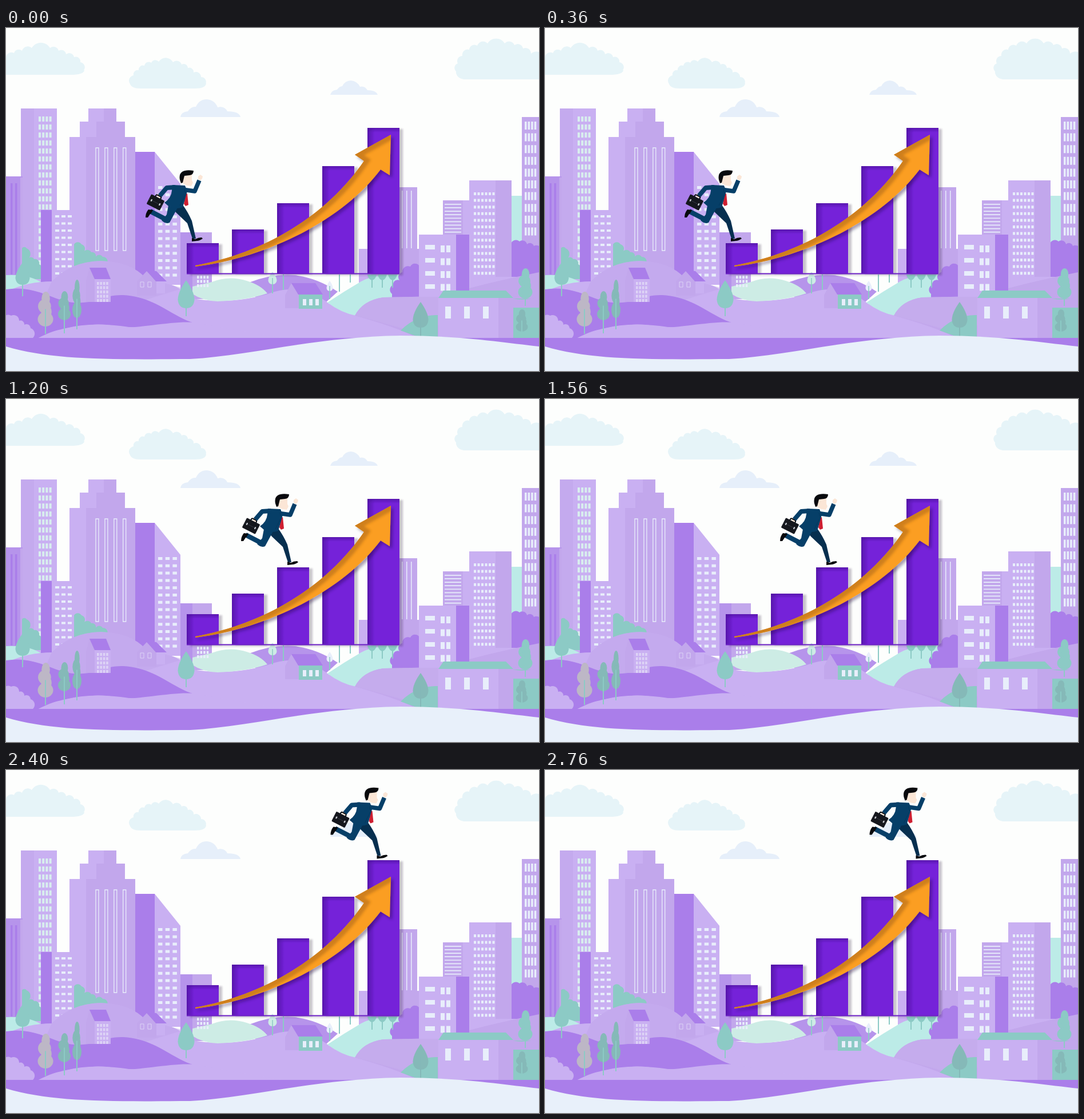
Write an HTML page that moves like this. It is 932x601 px and loops after 3 s.

```html
<!DOCTYPE html>
<html lang="en">
<head>
<meta charset="utf-8">
<title>Climbing the chart</title>
<style>
  html, body { margin: 0; width: 100%; height: 100%; overflow: hidden; background: #fdfefd; }
  svg { display: block; width: 932px; height: 601px; }
</style>
</head>
<body>
<svg id="stage" viewBox="0 0 932 601" xmlns="http://www.w3.org/2000/svg"></svg>
<script>
const C = {
  light: '#c9b0f2', mid: '#c2a7ec', soft: '#b694eb', dark: '#aa7eea',
  teal: '#8ccac5', mint: '#bcebe7', pale: '#cdece5', glass: '#e8eefb',
  leaf: '#85b9b8', grey: '#bdb7c6', sky: '#e6f4f8', haze: '#e6effa',
  navy: '#063f68', deep: '#062f4f', skin: '#fbe6d6', ink: '#08090d'
};

const path = (d, fill, extra = '') => `<path d="${d}" fill="${fill}" ${extra}/>`;
const box = (x, y, x2, y2, fill) => path(`M${x} ${y}H${x2}V${y2}H${x}z`, fill);
const line = (d, stroke, w, extra = '') => path(d, 'none', `stroke="${stroke}" stroke-width="${w}" ${extra}`);

// Regular block of windows
function grid(x, y, cols, rows, dx, dy, w, h, fill = C.glass) {
  let d = '';
  for (let r = 0; r < rows; r++)
    for (let c = 0; c < cols; c++)
      d += `M${x + c * dx} ${y + r * dy}h${w}v${h}h${-w}z`;
  return path(d, fill);
}

// Puffy outline: an arc over each pair of points, closed along a flat base
function puffs(pts, base, fill) {
  let d = `M${pts[0]}`;
  for (let i = 1; i < pts.length; i++) {
    const [a, b] = [pts[i - 1], pts[i]];
    const r = Math.hypot(b[0] - a[0], b[1] - a[1]) * 0.58;
    d += `A${r} ${r} 0 0 1 ${b}`;
  }
  return path(`${d}V${base}H${pts[0][0]}z`, fill);
}

function leafTree(x, top, low, foot, w, fill, trunk = fill) {
  const h = low - top;
  return line(`M${x} ${top + h * .4}V${foot}`, trunk, 2) +
    path(`M${x} ${top}C${x + w * .3} ${top + h * .25} ${x + w * .5} ${top + h * .5} ${x + w * .5} ${top + h * .7}
      Q${x + w * .45} ${low} ${x} ${low}Q${x - w * .45} ${low} ${x - w * .5} ${top + h * .7}
      C${x - w * .5} ${top + h * .5} ${x - w * .3} ${top + h * .25} ${x} ${top}z`, fill) +
    line(`M${x} ${top + h * .5}V${foot}`, trunk, 1.5);
}

function wavyTree(x, top, low, foot, w, fill, trunk = C.teal) {
  const h = low - top, blob = (dx, f, rx, ry) =>
    `<ellipse cx="${x + dx * w}" cy="${top + f * h}" rx="${rx * w}" ry="${ry * h}" fill="${fill}"/>`;
  return blob(.02, .2, .27, .2) + blob(-.06, .42, .42, .2) + blob(.06, .58, .34, .2) + blob(0, .79, .5, .21) +
    line(`M${x} ${top + h * .5}V${foot}`, trunk, 2);
}

function clouds() {
  return puffs([[-8, 76], [0, 52], [14, 44], [28, 40], [45, 35], [77, 35], [92, 40], [105, 46], [119, 51], [130, 60], [136, 74]], 76, C.sky) +
    path('M-8 74H137Q136 82 112 82H-8z', C.sky) +
    puffs([[217, 98], [223, 83], [232, 74], [242, 66], [254, 61], [267, 59], [292, 60], [307, 64], [318, 70], [328, 78], [341, 86], [349, 98]], 99, C.sky) +
    path('M217 97H350Q349 106 330 106H236Q218 106 217 97z', C.sky) +
    puffs([[787, 76], [790, 62], [798, 49], [810, 38], [824, 31], [842, 27], [872, 27], [889, 30], [904, 36], [918, 45], [940, 51]], 80, C.sky) +
    path('M787 74H932V90H801Q786 88 787 74z', C.sky) +
    path('M305 156Q306 147 318 146Q324 137 332 138Q338 125 351 125Q365 126 370 139Q382 136 387 146Q408 146 410 156z', C.haze) +
    path('M567 117Q569 109 579 108Q583 102 588 102Q593 92 603 92Q614 93 619 103Q627 101 632 109Q647 109 650 117z', C.haze);
}

function leftCity() {
  return box(26, 141, 49, 445, C.mid) + box(49, 141, 89, 445, C.light) + box(26, 141, 49, 445, '#c4aaee') +
    grid(57, 155, 4, 20, 6.2, 14, 4, 9, '#d8eeee') +
    box(0, 260, 29, 434, C.soft) + box(25, 262, 29, 434, C.mid) +
    grid(8, 272, 2, 1, 8, 0, 3.5, 160, C.dark) +
    puffs([[28, 386], [36, 386], [39, 404], [49, 405], [58, 414], [61, 436]], 440, C.teal) +
    path('M144 141H193V164H208V191H226V446H111V191H129V164H144z', C.mid) +
    path('M144 141H171V164H158V191H140V446H111V191H129V164H144z', C.light) +
    grid(157, 210, 4, 1, 15.9, 0, 5, 180, 'none').replace('/>', ` stroke="${C.glass}" stroke-width="1.3"/>`) +
    puffs([[119, 379], [132, 379], [136, 392], [149, 393], [157, 401], [169, 401], [177, 412]], 425, C.teal) +
    box(61, 319, 80, 445, C.dark) + box(80, 319, 117, 445, C.light) +
    grid(86, 328, 3, 9, 11, 12.5, 7, 4) +
    box(226, 217, 260, 446, C.dark) + path('M260 217L305 273V450H260z', C.light) +
    grid(266, 277, 3, 13, 12.7, 12.8, 7.5, 5) +
    box(305, 358, 326, 475, C.soft) + box(326, 358, 360, 475, C.mid);
}

function rightCity() {
  return box(687, 279, 719, 390, C.mid) + grid(692, 285, 3, 1, 8, 0, 1.5, 101) +
    box(617, 387, 722, 446, C.light) + box(632, 387, 722, 446, C.mid) +
    box(884, 294, 902, 378, C.mint) +
    box(902, 156, 932, 440, C.mid) + grid(907, 164, 4, 10, 5.6, 20.6, 3.5, 14) +
    puffs([[883, 378], [898, 374], [911, 379], [923, 382], [936, 389]], 445, C.dark) +
    box(764, 302, 799, 364, C.mid) + box(799, 302, 810, 364, C.light) +
    grid(767, 308, 1, 9, 0, 6.1, 29, 1.7) +
    box(810, 267, 859, 462, C.light) + box(856, 267, 884, 462, C.mid) +
    grid(818, 288, 6, 13, 6.5, 11.6, 4, 5);
}

function hills() {
  return path('M0 433Q40 431 62 446V468H0z', C.mint) +
    path('M425 446Q465 430 505 433Q545 438 580 462L560 480H440z', C.soft) +
    path('M0 462Q38 444 80 444Q112 410 165 408Q219 410 244 438L270 445Q300 449 326 474Q400 486 470 462Q520 448 565 483L620 500L700 468V436H932V545H0z', C.light) +
    path('M80 444Q112 410 165 408Q219 410 244 438L310 456L200 490H60z', C.mid, 'opacity=".55"') +
    path('M360 445Q390 433 421 443Q445 450 457 465Q422 477 370 479Q344 478 326 466V453L360 445z', C.pale) +
    path('M562 481Q592 461 621 444Q642 432 688 432H722V475L612 504Q586 499 562 481z', C.mint) +
    puffs([[675, 466], [677, 450], [688, 442], [693, 428], [707, 418], [722, 416]], 472, C.dark) +
    path('M610 504Q624 477 660 472L760 470Q840 446 932 428V545H722Q690 526 610 504z', C.mid) +
    path('M610 504Q624 477 660 472L760 470V520L712 532Q670 519 610 504z', '#c5aced') +
    path('M0 458Q24 454 47 460C82 468 98 484 135 481C165 479 174 467 205 468C260 471 288 504 326 516C270 520 246 526 215 524Q150 514 105 526L57 543H0z', C.dark) +
    path('M57 543C85 528 107 525 132 523C174 514 190 526 226 524C276 519 300 514 330 516L480 543z', C.light) +
    puffs([[-6, 512], [9, 504], [23, 513], [32, 520], [43, 526], [47, 543]], 543, C.light) +
    path('M690 530Q718 502 755 503V541H720z', C.teal) + box(886, 474, 932, 543, C.teal) +
    path('M886 474Q908 479 932 470V490H886z', C.mid);
}

function houses() {
  return path('M140 443L146 420L158 440V480H140z', C.mid) + box(155, 440, 183, 480, C.light) +
    path('M146 420H175L183 440H155z', C.dark) + grid(159, 445, 4, 5, 5.4, 7.5, 3.5, 5, '#ddd3f6') +
    path('M229 444L246 426L263 444V469H229z', C.mid) + path('M245 424L263 426L281 444H262z', C.dark) +
    box(263, 444, 278, 465, C.light) + grid(235, 445, 2, 1, 13, 0, 6, 9, 'none').replace('/>', ` stroke="#ddd3f6"/>`) +
    grid(334, 434, 4, 3, 5.6, 7.5, 3.5, 5) +
    path('M488 468L499 447L513 467V491H488z', C.mid) + path('M499 447H541L554 467H511z', C.dark) +
    box(512, 467, 553, 492, C.teal) + grid(519, 475, 3, 1, 11, 0, 6, 11) +
    box(722, 362, 787, 471, C.light) + box(787, 362, 810, 462, C.dark) +
    grid(733, 380, 1, 4, 0, 23, 17, 8) + grid(760, 381, 2, 4, 10, 22.5, 7, 12) +
    box(756, 472, 861, 543, C.light) + box(861, 472, 887, 543, C.mid) +
    path('M765 460H874L887 473H756z', C.teal) + grid(768, 488, 3, 1, 33, 0, 10, 21);
}

function trees() {
  let fringe = '';
  for (let x = 640; x < 682; x += 18)
    fringe += path(`M${x - 8} 432h16q-2 9 -8 10q-6 -1 -8 -10z`, C.teal) + line(`M${x} 434V455`, C.teal, 2);
  return leafTree(29, 411, 450, 470, 25, C.teal) +
    wavyTree(69, 462, 523, 536, 27, C.grey) + wavyTree(102, 461, 512, 535, 22, C.leaf) +
    wavyTree(124, 441, 508, 528, 16, C.leaf) + leafTree(315, 442, 491, 505, 29, C.teal) +
    leafTree(466, 427, 449, 465, 15, C.pale, C.teal) + line('M485 432V459M583 432V462M602 432V446', C.teal, 2) +
    leafTree(566, 443, 461, 475, 11, C.glass, C.teal) + fringe +
    leafTree(725, 480, 525, 540, 27, C.leaf) +
    wavyTree(908, 421, 474, 487, 25, C.teal) + wavyTree(902, 493, 532, 535, 21, C.leaf);
}

function ground() {
  return box(0, 543, 932, 601, C.dark) +
    path('M0 558C80 582 180 581 322 580C430 574 540 541 690 539C790 539 862 550 932 558V601H0z', '#e8f0fa');
}

const edge = 'M331 416C450 395 560 330 626 233L610 222L673 187';
const arrow = edge + 'L671 258L655 248C590 335 460 402 331 418z';

function runner() {
  const limb = 'stroke-linejoin="round"';
  return line('M294 314L281 336L252 321', C.navy, 8.5, limb) +
    path('M286 310H309Q318 322 325 338L332 369H326L317 342L298 324z', C.deep) +
    path('M284 311L300 315L286 341Q279 344 272 337L281 327z', C.navy) +
    path('M244 332Q244 324 249 318L257 319Q254 325 252 326L248 332z', C.ink) +
    path('M325 374V368L331 370Q336 367 342 367L344 369Q338 373 334 373z', C.ink) +
    `<circle cx="268" cy="294" r="4" fill="${C.skin}"/>` +
    `<g transform="translate(261.5 305.5) rotate(27)">
      <rect x="-5" y="-13" width="10" height="6" rx="2" fill="none" stroke="${C.ink}" stroke-width="2"/>
      <rect x="-13" y="-9.5" width="26" height="19" rx="1.5" fill="#15171d"/>
      <path d="M-13 0H13" stroke="#353943"/><path d="M-8 -2v4M8 -2v4" stroke="#d9dce2" stroke-width="2"/></g>` +
    path('M311 276L320 276L318 293L312 300z', '#fff') +
    path('M314 291L317 290L319 310L314 312L311 308z', '#cf1f31') +
    path('M291 275L313 276L317 286L309 314Q296 319 284 312L277 306Q289 298 290 285z', C.navy) +
    line('M296 279L281 280L269 294', C.navy, 8, limb) +
    line('M309 283L330 286L338 267', C.navy, 7.5, limb) +
    path('M312 282L314 291L304 311', 'none', 'stroke="#02375d"') +
    path('M336 265L336 260L340 257L344 260L343 264L340 267z', C.skin) +
    path('M309 259L325 256L325 267L327 271L324 277L316 276L309 272z', C.skin) +
    path('M304 266Q302 256 308 252Q314 248 328 250Q328 257 321 258L312 259L309 271L306 272z', C.ink);
}

const bars = [
  { x: 316, low: 377, high: 377 }, { x: 395, low: 353, high: 341 }, { x: 474, low: 307, high: 295 },
  { x: 553, low: 242, high: 222 }, { x: 632, low: 175, high: 158 }
];
const hops = [[0, 0], [89.5, -35], [167, -83], [245, -155.5], [323.5, -218.5]];

const stage = document.getElementById('stage');
stage.innerHTML = `<defs>
  <linearGradient id="side"><stop offset="0" stop-color="#4d139d" stop-opacity=".75"/><stop offset="1" stop-color="#4d139d" stop-opacity="0"/></linearGradient>
  <linearGradient id="lid" x2="0" y2="1"><stop offset="0" stop-color="#4d139d" stop-opacity=".7"/><stop offset="1" stop-color="#4d139d" stop-opacity="0"/></linearGradient>
  <filter id="blur" x="-10%" y="-10%" width="120%" height="120%"><feGaussianBlur stdDeviation="2"/></filter>
  <filter id="drop" x="-10%" y="-10%" width="125%" height="120%"><feDropShadow dx="6" dy="2" stdDeviation="1.8" flood-color="#302840" flood-opacity=".25"/></filter>
  <filter id="cast" x="-10%" y="-10%" width="120%" height="120%"><feDropShadow dx="4" dy="4" stdDeviation="2.5" flood-color="#1c0838" flood-opacity=".38"/></filter>
  <clipPath id="inside"><path d="${arrow}"/></clipPath></defs>
  ${box(0, 0, 932, 601, '#fdfefd')}
  ${clouds()}${leftCity()}${rightCity()}${hills()}${houses()}${trees()}${ground()}
  <g filter="url(#drop)">${bars.map(b => `<g class="bar" transform="translate(${b.x} 0)">
    <rect width="56" fill="#7422d9"/><rect width="13" fill="url(#side)"/><rect class="lid" width="56" height="8" fill="url(#lid)"/></g>`).join('')}
    ${box(316, 429.5, 687, 431.5, '#6c20c4')}</g>
  <g filter="url(#cast)">${path(arrow, '#fb9e24')}</g>
  <g clip-path="url(#inside)">${line(edge, '#c77a1b', 17, 'filter="url(#blur)" opacity=".85"')}</g>
  <g id="man">${runner()}</g>`;

const man = document.getElementById('man');
const shapes = [...stage.querySelectorAll('.bar')];

function draw(ms) {
  const step = Math.floor(ms % 3000 / 600);
  man.setAttribute('transform', `translate(${hops[step]})`);
  shapes.forEach((g, i) => {
    const top = step >= i ? bars[i].high : bars[i].low;
    for (const r of g.children) {
      r.setAttribute('y', top);
      if (!r.classList.contains('lid')) r.setAttribute('height', 431 - top);
    }
  });
}

const start = performance.now();
function tick() {
  draw(performance.now() - start);
  requestAnimationFrame(tick);
}
tick();
</script>
</body>
</html>
```
